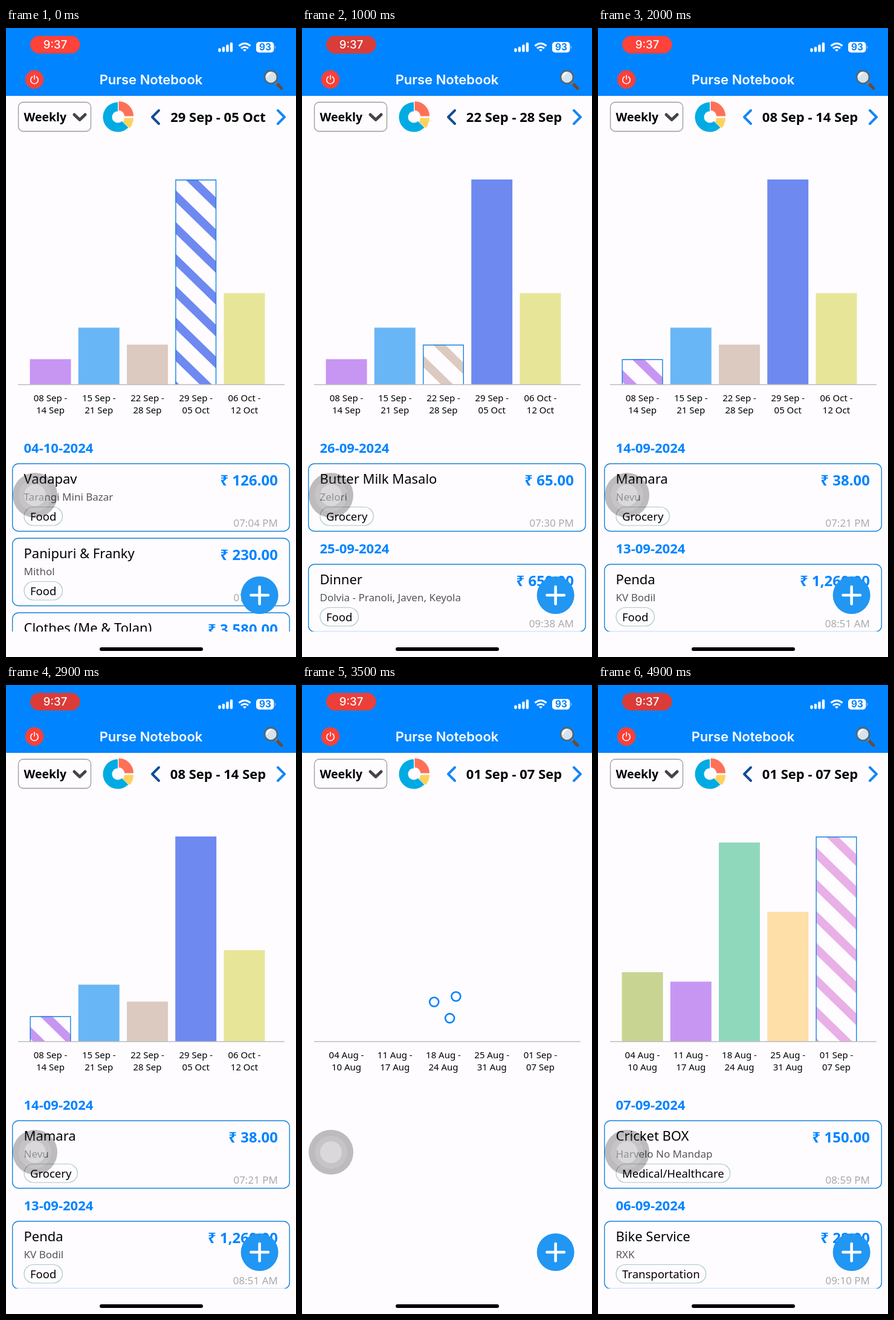
Recreate the animation shown at these times as an HTML page. Size 480 px wide and 1038 px high, loop 5000 ms.

```html
<!DOCTYPE html>
<html lang="en">
<head>
<meta charset="utf-8">
<title>Weekly expenses</title>
<style>
  html, body { margin: 0; width: 100%; height: 100%; overflow: hidden; background: #fefcff; }
  svg { display: block; width: 100%; height: 100%; font-family: "Noto Sans", "Open Sans", sans-serif; }
  .ui { font-family: Inter, Roboto, sans-serif; }
  .bold { font-weight: 700; }
  .range { font-size: 22px; }
  .tick { font-size: 15px; text-anchor: middle; }
  .day { font-size: 22px; fill: #0084ff; }
  .title { font-size: 22px; }
  .place { font-size: 17px; fill: #555; }
  .amount { font-size: 24px; fill: #0084ff; text-anchor: end; }
  .time { font-size: 17px; fill: #aaa; text-anchor: end; }
  .chip { font-size: 18.5px; }
  .line { fill: none; stroke-linecap: round; stroke-linejoin: round; }
</style>
</head>
<body>
<svg viewBox="0 0 480 1038">
  <defs>
    <clipPath id="listClip"><rect y="676" width="480" height="320"/></clipPath>
  </defs>
  <rect width="480" height="1038" fill="#fefcff"/>

  <!-- status and title bars -->
  <rect width="480" height="112" fill="#0084ff"/>
  <rect id="pill" x="40" y="13" width="82.5" height="29" rx="14.5"/>
  <text class="ui" x="81.5" y="34" font-size="18.5" font-weight="500" fill="#fff" text-anchor="middle">9:37</text>
  <path d="M353.5 35.5v2M360 33v4.500M366.500 29.500v8M373 26v11.500" class="line" stroke="#fff" stroke-width="4.500"/>
  <g class="line" stroke="#fff" stroke-width="3" style="stroke-linecap:butt">
    <path d="M385.500 29.500q9.500-8 19 0M389 33.500q6-4.500 12 0"/>
    <path d="M392 36l3 3 3-3q-3-2-6 0z" fill="#fff" stroke="none"/>
  </g>
  <rect x="414" y="23" width="29.500" height="17.500" rx="5" fill="#fff"/>
  <path d="M445 29q2.500 2.500 0 6z" fill="#9fd0ff"/>
  <text class="ui bold" x="429" y="37.300" font-size="15.500" fill="#0084ff" text-anchor="middle">93</text>
  <circle cx="47" cy="85" r="15.200" fill="#f8413a"/>
  <path d="M43.700 80.500a6.200 6.200 0 1 0 6.600 0M47 78v6.500" class="line" stroke="#fff" stroke-width="1.600"/>
  <text class="ui" x="240" y="92.500" font-size="22" font-weight="600" fill="#fff" text-anchor="middle">Purse Notebook</text>
  <g class="line">
    <path d="M446 90l4 4" stroke="#777" stroke-width="4"/>
    <path d="M450 93.500l6 6" stroke="#6d4a35" stroke-width="5"/>
    <circle cx="438.500" cy="81" r="10.500" fill="#d3e4ef" stroke="#59636b" stroke-width="2.500"/>
    <path d="M432 80q1-5 6-6" stroke="#fff" stroke-width="2.500"/>
  </g>

  <!-- period controls -->
  <rect x="20.500" y="122.500" width="120" height="48" rx="8" fill="none" stroke="#999" stroke-width="1.300"/>
  <text class="bold" x="29.500" y="154" font-size="19.500">Weekly</text>
  <path d="M113 143l9 8.500 9-8.500" class="line" stroke="#444" stroke-width="5"/>
  <g id="donut"></g>
  <path id="back" d="M253 136l-11 11 11 11" class="line" stroke-width="4"/>
  <path d="M450 136l11 11-11 11" class="line" stroke="#1586f5" stroke-width="4"/>
  <text id="range" class="bold range" x="351" y="155" text-anchor="middle"></text>

  <g id="chart"></g>
  <path d="M20 588.500H461" stroke="#bbb" stroke-width="1.300"/>
  <g id="loader" fill="none" stroke="#0084ff" stroke-width="2.600"></g>
  <g id="list" clip-path="url(#listClip)"></g>

  <!-- floating controls -->
  <circle cx="48" cy="771" r="37" fill="#000" opacity=".26"/>
  <circle cx="48" cy="771" r="27" fill="#fff" opacity=".13"/>
  <circle cx="48" cy="771" r="18" fill="#fff" opacity=".34"/>
  <circle cx="419.700" cy="936" r="31" fill="#2196f3"/>
  <path d="M405.500 936h28.500M419.700 922v28.500" class="line" stroke="#fff" stroke-width="4.600"/>
  <rect x="155" y="1022" width="171" height="6" rx="3"/>
</svg>
<script>
const LOOP = 5000, STEP = 100, BASE = 588;
const el = id => document.getElementById(id);
const text = (cls, x, y, s) => `<text class="${cls}" x="${x}" y="${y}">${s}</text>`;

const autumn = {
  weeks: ["08 Sep - 14 Sep", "15 Sep - 21 Sep", "22 Sep - 28 Sep", "29 Sep - 05 Oct", "06 Oct - 12 Oct"],
  tops: [546.5, 494.5, 522.5, 250, 437.5],
  colors: ["#c796f3", "#69b6f6", "#dccac0", "#6e89f0", "#e7e698"]
};
const summer = {
  weeks: ["04 Aug - 10 Aug", "11 Aug - 17 Aug", "18 Aug - 24 Aug", "25 Aug - 31 Aug", "01 Sep - 07 Sep"],
  tops: [474, 489.5, 260, 374.5, 250],
  colors: ["#c8d592", "#c796f3", "#90d8bc", "#fedfa8", "#e8b0e6"]
};

// A single string is a day heading; arrays are title, place, tag, amount, time.
const scenes = [
  { from: 0, page: autumn, pick: 3, rows: ["04-10-2024",
    ["Vadapav", "Tarangi Mini Bazar", "Food", "126.00", "07:04 PM"],
    ["Panipuri &amp; Franky", "Mithol", "Food", "230.00", "07:03 PM"],
    ["Clothes (Me &amp; Tolan)", "", "Shopping", "3,580.00", "06:40 PM"]] },
  { from: 200, page: autumn, pick: 2, rows: ["26-09-2024",
    ["Butter Milk Masalo", "Zelori", "Grocery", "65.00", "07:30 PM"], "25-09-2024",
    ["Dinner", "Dolvia - Pranoli, Javen, Keyola", "Food", "650.00", "09:38 AM"]] },
  { from: 1100, page: autumn, pick: 1, rows: ["20-09-2024",
    ["Vegetables", "Mithol", "Grocery", "90.00", "07:12 PM"], "19-09-2024",
    ["Snacks", "Zelori", "Food", "240.00", "08:20 PM"]] },
  { from: 1900, page: autumn, pick: 0, rows: ["14-09-2024",
    ["Mamara", "Nevu", "Grocery", "38.00", "07:21 PM"], "13-09-2024",
    ["Penda", "KV Bodil", "Food", "1,260.00", "08:51 AM"]] },
  { from: 3000, page: summer, pick: 4, loading: true, rows: [] },
  { from: 3600, page: summer, pick: 4, rows: ["07-09-2024",
    ["Cricket BOX", "Harvelo No Mandap", "Medical/Healthcare", "150.00", "08:59 PM"], "06-09-2024",
    ["Bike Service", "RXK", "Transportation", "28.00", "09:10 PM"]] }
];
const presses = [[0, 200], [900, 1100], [1700, 1900], [2800, 3000], [4800, 5000]];

function ringSlice(cx, cy, start, end, color, outer = 24.5, inner = 9.5) {
  const at = (r, deg) => {
    const a = deg * Math.PI / 180;
    return `${cx + r * Math.cos(a)} ${cy + r * Math.sin(a)}`;
  };
  const large = end - start > 180 ? 1 : 0;
  return `<path fill="${color}" d="M${at(outer, start)}A${outer} ${outer} 0 ${large} 1 ${at(outer, end)}
    L${at(inner, end)}A${inner} ${inner} 0 ${large} 0 ${at(inner, start)}Z"/>`;
}

function stripes(x, top, color) {
  const slope = 0.97, gap = 52.5, thick = 19.5, w = 68;
  let d = "";
  for (let y = top + 17 - 2 * gap; y < BASE; y += gap)
    d += `M${x} ${y}l${w} ${w * slope}v${thick}l${-w} ${-w * slope}z`;
  return `<clipPath id="barClip"><rect x="${x}" y="${top}" width="${w}" height="${BASE - top}"/></clipPath>
    <path d="${d}" fill="${color}" clip-path="url(#barClip)"/>
    <path d="M${x + .7} ${BASE}V${top + .7}h${w - 1.4}V${BASE}" fill="none" stroke="#1583e0" stroke-width="1.4"/>`;
}

function chartMarkup({ page, pick, loading }) {
  return page.weeks.map((week, i) => {
    const x = 39.5 + 80.25 * i, top = page.tops[i], color = page.colors[i];
    const bar = loading ? "" : i === pick ? stripes(x, top, color)
      : `<rect x="${x}" y="${top}" width="68" height="${BASE - top}" fill="${color}"/>`;
    const [first, last] = week.split(" - ");
    return bar + text("tick", x + 34, 616, first + " -") + text("tick", x + 34, 636, last);
  }).join("");
}

function listMarkup(rows) {
  let y = 676;
  return rows.map(row => {
    if (typeof row === "string") {
      y += 43;
      return text("bold day", 29.5, y - 18.5, row);
    }
    const [title, place, tag, amount, time] = row, top = y;
    y += 123;
    return `<rect x="10.7" y="${top}" width="458.6" height="111.5" rx="10" fill="none" stroke="#1583d8" stroke-width="1.4"/>`
      + text("title", 29.5, top + 33, title) + text("place", 29.5, top + 61, place)
      + `<rect class="tag" x="30" y="${top + 71.5}" height="30.5" rx="15.2" fill="none" stroke="#a9c8cc" stroke-width="1.2"/>`
      + text("chip", 40, top + 93.5, tag)
      + text("bold amount", 450, top + 35.5, "₹ " + amount) + text("time", 450, top + 104, time);
  }).join("");
}

function showScene(scene) {
  el("range").textContent = scene.page.weeks[scene.pick];
  el("chart").innerHTML = chartMarkup(scene);
  el("list").innerHTML = listMarkup(scene.rows);
  for (const tag of document.querySelectorAll(".tag"))
    tag.setAttribute("width", tag.nextElementSibling.getComputedTextLength() + 20);
}

function loaderMarkup(t) {
  const turn = 4 + (t - 3300) * 0.36;
  return [0, 120, 240].map(offset => {
    const a = (turn + offset) * Math.PI / 180;
    return `<circle cx="${239.4 + 21.5 * Math.cos(a)}" cy="${529 + 21.5 * Math.sin(a)}" r="7.5"/>`;
  }).join("");
}

let shown;
function render(now) {
  const t = Math.floor(now % LOOP / STEP) * STEP;
  const scene = scenes.findLast(s => t >= s.from);
  if (scene !== shown) showScene(shown = scene);
  el("loader").innerHTML = scene.loading ? loaderMarkup(t) : "";
  const pressed = presses.some(([a, b]) => t >= a && t < b);
  el("back").setAttribute("stroke", pressed ? "#124c94" : "#1586f5");
  const dim = (1 - Math.cos(t * Math.PI / 1000)) / 2;
  el("pill").setAttribute("fill", `rgb(${255 - 37 * dim},${66 - 6 * dim},${58 - 2 * dim})`);
}

el("donut").innerHTML = ringSlice(185, 147, 45, 270, "#00abe3")
  + ringSlice(186.5, 145.5, -90, 0, "#ff7058") + ringSlice(186.5, 148.5, 0, 43, "#ffd15c");

const start = performance.now();
function frame() {
  render(performance.now() - start);
  requestAnimationFrame(frame);
}
frame();
</script>
</body>
</html>
```
